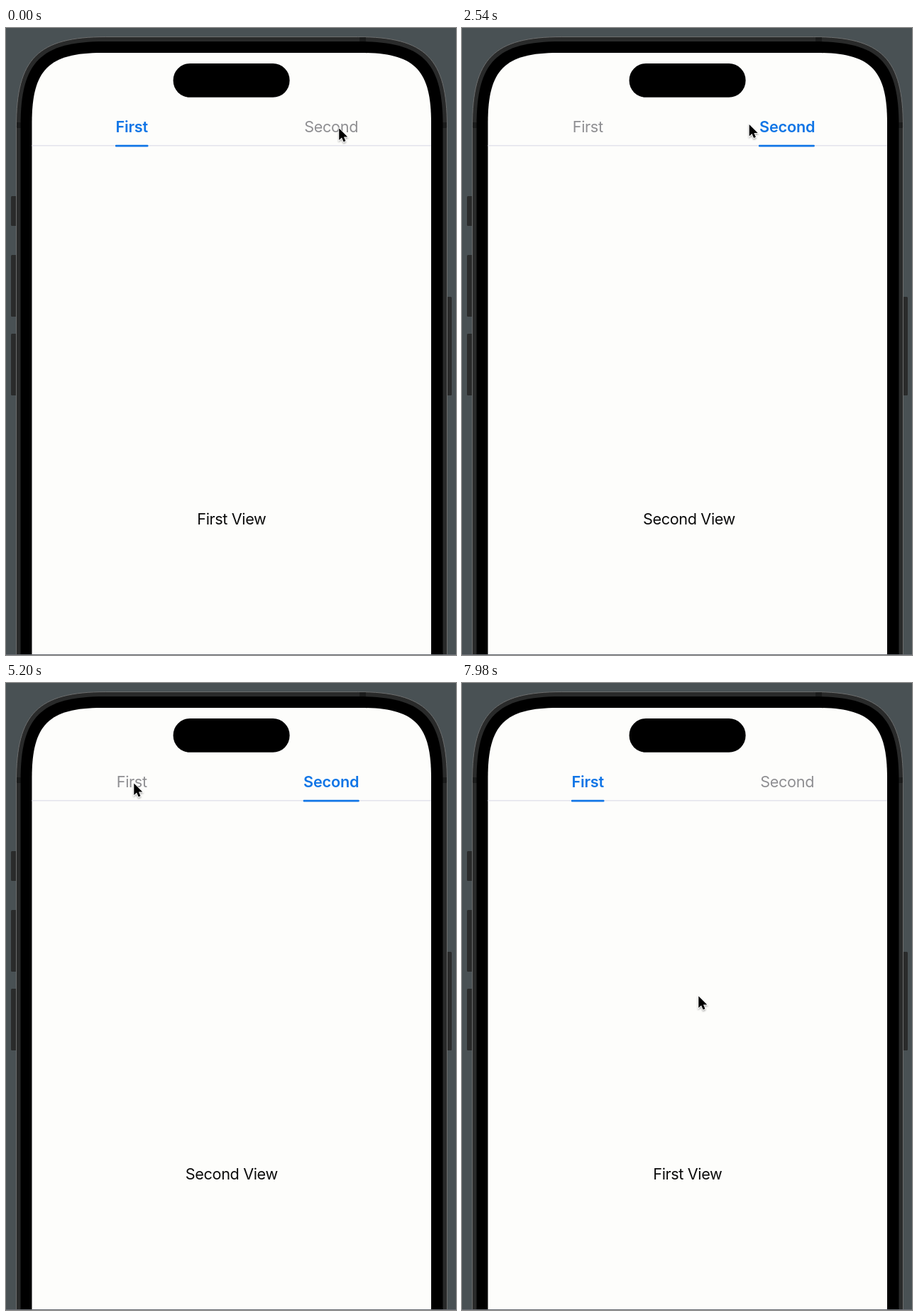
These frames come from a looping animation (634x884 px, 8000 ms). An HTML page:

```html
<!DOCTYPE html>
<html lang="en">
<head>
<meta charset="utf-8">
<title>Tab pager</title>
<style>
  html, body { margin: 0; width: 100%; height: 100%; overflow: hidden; background: #495154; }
  svg { display: block; width: 634px; height: 884px; }
  text { font: 400 21.7px Inter, "Open Sans", sans-serif; letter-spacing: -.4px; text-anchor: middle; fill: #0b0b0b; }
  .off { fill: #8f8f92; }
  .grey, .blue { font-weight: 600; letter-spacing: -.2px; }
  .grey { fill: #8f8f92; }
  .blue { fill: #1075e6; }
</style>
</head>
<body>
<svg viewBox="0 0 634 884">
  <defs>
    <clipPath id="clip"><path id="clipShape"/></clipPath>
    <filter id="shadow" x="-50%" y="-50%" width="220%" height="220%">
      <feDropShadow dx="0" dy="1.5" stdDeviation="1.2" flood-opacity=".4"/>
    </filter>
  </defs>
  <rect width="634" height="884" fill="#495154"/>
  <g fill="#2a2b2b">
    <rect x="7" y="237" width="8" height="42" rx="1.5"/>
    <rect x="7" y="320" width="8" height="87" rx="1.5"/>
    <rect x="7" y="431" width="8" height="87" rx="1.5"/>
    <rect x="621" y="379" width="7" height="139" rx="1.5"/>
  </g>
  <path id="rim" fill="#292a2a" stroke="#6c6d6d"/>
  <path d="M498 13h9v7h-9zM15 133h6v8h-6zM615 133h6v8h-6z" fill="#1b1c1c"/>
  <path id="bezel"/>
  <path id="screen" fill="#fdfdfb"/>
  <g clip-path="url(#clip)">
    <rect x="36" y="165" width="563" height="1.6" fill="#e5e5ed"/>
    <g id="pages">
      <text x="317.8" y="700">First View</text>
      <text x="879.8" y="700">Second View</text>
    </g>
    <g id="tabs"></g>
    <rect id="bar" y="164.7" height="2.8" rx="1" fill="#1075e6"/>
  </g>
  <rect x="235.6" y="50" width="164" height="47.8" rx="23.5"/>
  <rect y="883" width="634" height="1" fill="#6a6d74"/>
  <g id="cursor">
    <path d="M.3 1.5V18L4.1 14.5L6.7 20.5L9.5 19.3L7 13.5H12.3Z" stroke="#fff" stroke-width="1.5"
      paint-order="stroke" filter="url(#shadow)"/>
  </g>
</svg>
<script>
const $ = id => document.getElementById(id);
const LOOP = 8000, FPS = 60, PAGE = 562;
const TO_SECOND = 29.2, TO_FIRST = 117.3, PAGE_LAG = 1;
const TABS = [{ name: 'First', x: 177.2, width: 46.5 }, { name: 'Second', x: 458.2, width: 79 }];

// Phone outline with continuous corners, open below the stage
function outline(left, right, top, r) {
  const l = 1.25 * r, c = .3 * r;
  return `M${left} 900V${top + l}C${left} ${top + c} ${left + c} ${top} ${left + l} ${top}` +
    `H${right - l}C${right - c} ${top} ${right} ${top + c} ${right} ${top + l}V900Z`;
}
$('rim').setAttribute('d', outline(14.5, 621.5, 12.5, 101));
$('bezel').setAttribute('d', outline(20.5, 615.5, 19, 95));
for (const id of ['screen', 'clipShape']) $(id).setAttribute('d', outline(36.5, 599, 35, 79));

$('tabs').innerHTML = TABS.map(tab => ['off', 'grey', 'blue'].map(kind =>
  `<text class="${kind}" x="${tab.x}" y="146.6">${tab.name}</text>`).join('')).join('');
const labels = [...$('tabs').children];

// Cursor stops: tick, x, y, easing towards the stop
const easeOut = k => 1 - (1 - k) ** 2.4;
const smooth = k => k * k * (3 - 2 * k);
const PATH = [
  [0, 469, 140], [18, 463, 140, smooth], [48, 463, 140, smooth],
  [72, 237, 119, smooth], [92, 180, 140, easeOut],
  [127, 180, 140, smooth], [147, 290, 393, smooth], [164, 333, 440, easeOut]
];
function cursorAt(tick) {
  const next = PATH.findIndex(stop => stop[0] > tick);
  if (next < 0) return PATH.at(-1).slice(1, 3);
  const [t0, x0, y0] = PATH[next - 1], [t1, x1, y1, ease] = PATH[next];
  const k = ease((tick - t0) / (t1 - t0));
  return [x0 + (x1 - x0) * k, y0 + (y1 - y0) * k];
}

// Critically damped spring with a 0.35 s response
function spring(ticks) {
  const x = Math.max(0, ticks) / FPS * 2 * Math.PI / .35;
  return 1 - (1 + x) * Math.exp(-x);
}
const progress = tick => spring(tick - TO_SECOND) - spring(tick - TO_FIRST);

// Playback rhythm: two short ticks, then a long one
function tickAt(ms) {
  const t = ms + 20;
  return Math.floor(t / 140) * 3 + Math.min(2, Math.floor(t % 140 / 20));
}

function render(ms) {
  const tick = tickAt(ms), p = progress(tick), [first, second] = TABS;
  const mix = key => first[key] + (second[key] - first[key]) * p;
  $('bar').setAttribute('x', mix('x') - mix('width') / 2);
  $('bar').setAttribute('width', mix('width'));
  $('pages').setAttribute('transform', `translate(${-PAGE * progress(tick - PAGE_LAG)} 0)`);

  const active = tick >= TO_SECOND && tick < TO_FIRST ? 1 : 0;
  const fade = active ? p : 1 - p;
  TABS.forEach((tab, i) => {
    const on = i === active;
    [on ? 0 : 1, on ? 1 - fade : 0, on ? fade : 0].forEach((value, j) =>
      labels[i * 3 + j].setAttribute('opacity', value));
  });
  $('cursor').setAttribute('transform', `translate(${cursorAt(tick).join(' ')})`);
}

function loop() {
  render(performance.now() % LOOP);
  requestAnimationFrame(loop);
}
loop();
</script>
</body>
</html>
```
